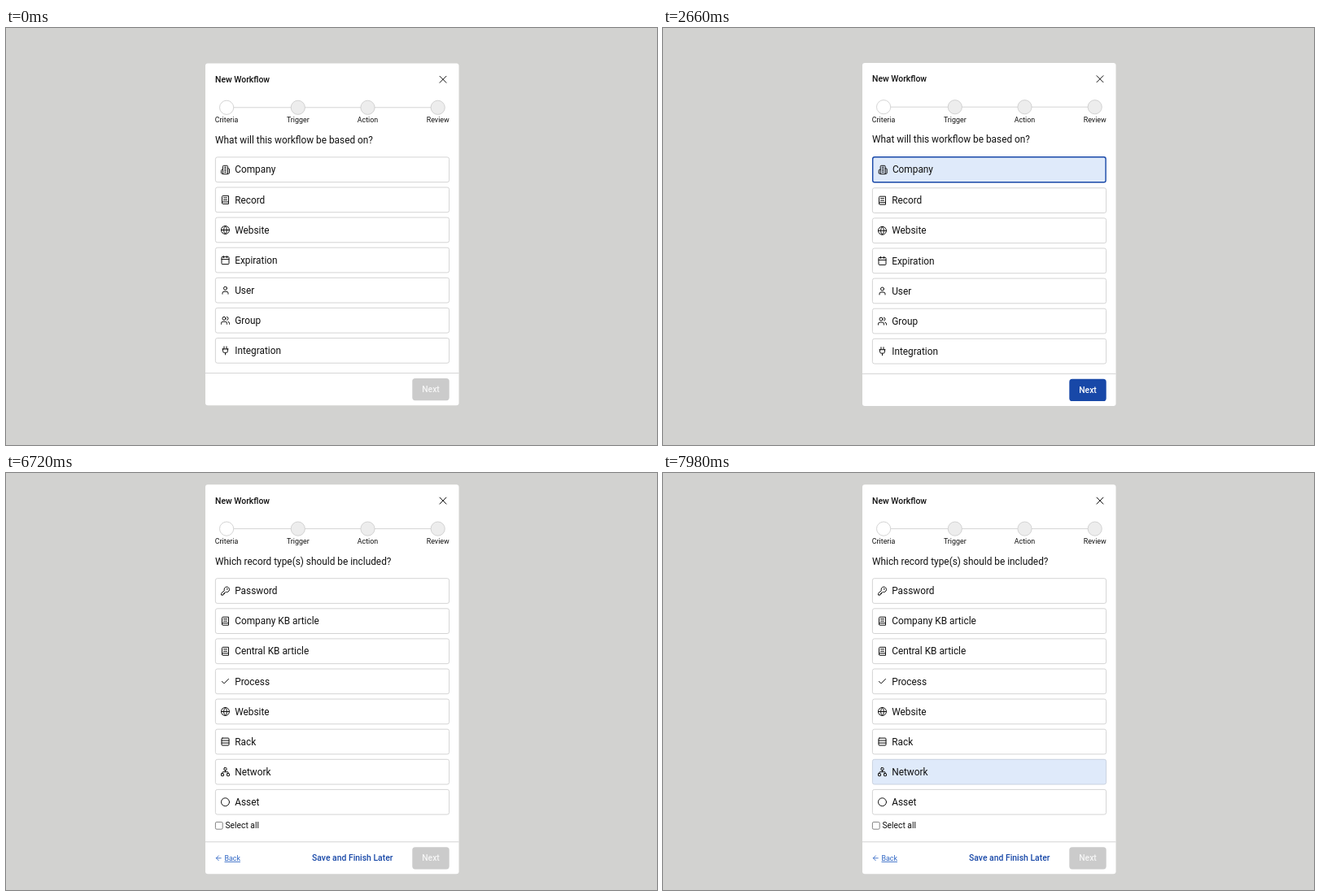
An HTML page for the animation above (8000 ms loop, 800x513 px).

```html
<!DOCTYPE html>
<html lang="en">
<head>
<meta charset="utf-8">
<title>New Workflow</title>
<style>
  html, body { margin: 0; width: 100%; height: 100%; overflow: hidden; background: #d2d2d0; }
  svg { display: block; width: 800px; height: 513px; font-family: Roboto, Arial, sans-serif; }
  .icon { fill: none; stroke: #111; stroke-width: 2; stroke-linecap: round; stroke-linejoin: round; }
  .medium { font-size: 10.4px; font-weight: 500; }
  .body { font-size: 11.85px; }
  .small { font-size: 8.87px; }
</style>
</head>
<body>
<svg id="stage" viewBox="0 0 800 513"></svg>
<script>
const LOOP = 8000;
const BLUE = '#1848a8', TINT = '#dfeafa', LINE = '#d0d0d0', INK = '#111';

const path = d => `<path d="${d}"/>`;
const ring = (x, y, r) => `<circle cx="${x}" cy="${y}" r="${r}"/>`;
const box = (x, y, w, h, r) => `<rect x="${x}" y="${y}" width="${w}" height="${h}" rx="${r}"/>`;
const rect = (x, y, w, h, r, fill, stroke = 'none', sw = 0) =>
  `<rect x="${x}" y="${y}" width="${w}" height="${h}" rx="${r}" fill="${fill}" stroke="${stroke}" stroke-width="${sw}"/>`;
const text = (x, y, cls, label, fill = INK, extra = '') =>
  `<text x="${x}" y="${y}" class="${cls}" fill="${fill}" ${extra}>${label}</text>`;
const hline = (x1, x2, y) => `<path d="M${x1} ${y}H${x2}" stroke="${LINE}" stroke-width=".9"/>`;
const shift = (y, inner) => `<g transform="translate(0 ${y})">${inner}</g>`;

// Icons live on a 24-unit grid
const ICONS = {
  building: path('M6 22V4a2 2 0 0 1 2-2h8a2 2 0 0 1 2 2v18ZM6 12H4a2 2 0 0 0-2 2v6a2 2 0 0 0 2 2h2M18 9h2a2 2 0 0 1 2 2v9a2 2 0 0 1-2 2h-2M10 6h4M10 10h4M10 14h4M10 18h4'),
  book: path('M4 19.5v-15A2.5 2.5 0 0 1 6.5 2H20v20H6.5a2.5 2.5 0 0 1 0-5H20M8 7h8M8 12h8'),
  globe: ring(12, 12, 10) + path('M12 2a14.5 14.5 0 0 0 0 20 14.5 14.5 0 0 0 0-20M2 12h20'),
  calendar: box(3, 4, 18, 18, 2) + path('M8 2v4M16 2v4M3 10h18'),
  user: ring(12, 7, 4) + path('M19 21v-2a4 4 0 0 0-4-4H9a4 4 0 0 0-4 4v2'),
  users: ring(9, 7, 4) + path('M16 21v-2a4 4 0 0 0-4-4H6a4 4 0 0 0-4 4v2M22 21v-2a4 4 0 0 0-3-3.9M16 3.1a4 4 0 0 1 0 7.8'),
  plug: path('M12 22v-5M9 8V2M15 8V2M5 8H19M18 8v5a4 4 0 0 1-4 4h-4a4 4 0 0 1-4-4V8'),
  key: path('M2.6 17.4L2 18.8V22H7V19H10V16H11.6L13.4 14.6a6.5 6.5 0 1 0-4-4Z') + ring(16.5, 7.5, .5),
  check: path('M20 6 9 17l-5-5'),
  rack: box(3, 3, 18, 18, 2) + path('M21 9H3M21 15H3'),
  network: box(16, 16, 6, 6, 1) + box(2, 16, 6, 6, 1) + box(9, 2, 6, 6, 1) + path('M5 16v-3a1 1 0 0 1 1-1h12a1 1 0 0 1 1 1v3M12 12V8'),
  circle: ring(12, 12, 10),
  close: path('M4 4L20 20M20 4L4 20'),
  back: path('M12 19l-7-7 7-7M19 12H5')
};
const icon = (name, x, y, scale = .5, stroke = INK) =>
  `<g class="icon" style="stroke:${stroke}" transform="translate(${x} ${y}) scale(${scale}) translate(-12 -12)">${ICONS[name]}</g>`;

const CRITERIA = [['building', 'Company'], ['book', 'Record'], ['globe', 'Website'], ['calendar', 'Expiration'],
  ['user', 'User'], ['users', 'Group'], ['plug', 'Integration']];
const TYPES = [['key', 'Password'], ['book', 'Company KB article'], ['book', 'Central KB article'], ['check', 'Process'],
  ['globe', 'Website'], ['rack', 'Rack'], ['network', 'Network'], ['circle', 'Asset']];
const STEPS = [['Criteria', 271.1], ['Trigger', 358.8], ['Action', 444.5], ['Review', 530.7]];

function header(question) {
  const steps = STEPS.map(([label, x], i) =>
    `<circle cx="${x}" cy="97.8" r="8.6" fill="${i ? '#ededed' : '#fff'}" stroke="#cacaca" stroke-width=".8"/>` +
    text(x, 116.4, 'small', label, INK, 'text-anchor="middle"')).join('');
  return text(257, 66.9, 'medium', 'New Workflow') + icon('close', 537, 63.3) +
    hline(271, 530, 97.8) + steps + text(257, 142, 'body', question);
}

function row([name, label], y, hovered, selected) {
  const dx = selected ? .7 : 0;
  const frame = selected
    ? rect(257.7, y - 15.3, 286.4, 30.9, 2.3, TINT, BLUE, 1.4)
    : rect(257.4, y - 15.2, 287.2, 30.7, 2.4, hovered ? TINT : '#fff', hovered ? '#c6cfdc' : LINE, .9);
  return frame + icon(name, 269.5 + dx, y + .2) + text(281.2 + dx, y + 4.3, 'body', label);
}

// y is the divider line above the buttons
function footer(y, active) {
  return shift(y, hline(245, 556.5, 0) + rect(499.3, 6.4, 45.4, 27.2, 3.6, active ? BLUE : '#cbcbcb') +
    text(522, 23.6, 'medium', 'Next', active ? '#fff' : '#f5f5f5', 'text-anchor="middle"'));
}

const card = (y, h) => rect(245, y, 311.5, h, 3, '#fff');

function criteria(hover, picked) {
  const rows = CRITERIA.map((item, i) =>
    row(item, 174.1 + 37.1 * i + (picked && i ? .8 : 0), hover === i, picked && i === 0)).join('');
  return (picked ? card(42.9, 422) : card(43.5, 420.7)) +
    shift(picked ? -.6 : 0, header('What will this workflow be based on?')) +
    rows + footer(picked ? 425.4 : 424.6, picked);
}

function types(hover) {
  return card(14.3, 479) + shift(-29.2, header('Which record type(s) should be included?')) +
    TYPES.map((item, i) => row(item, 144.9 + 37.1 * i, hover === i)).join('') +
    rect(257.4, 429.4, 8.8, 8.8, 1.5, '#fff', '#777', .9) +
    text(269.5, 437.4, '', 'Select all', INK, 'font-size="10.3"') + footer(453.8, false) +
    icon('back', 261.3, 473.8, .42, '#2f66c4') +
    text(268.5, 476.9, 'small', 'Back', '#2f66c4', 'text-decoration="underline"') +
    text(376, 477.4, 'medium', 'Save and Finish Later', BLUE);
}

// [start, screen, hovered row (-1 for none), picked]
const TIMELINE = [
  [0, criteria, -1, false], [2100, criteria, 0, false], [2660, criteria, 0, true],
  [4480, types, -1], [6300, types, 1], [6720, types, -1], [6790, types, 2],
  [7000, types, -1], [7070, types, 3], [7350, types, -1], [7420, types, 4],
  [7700, types, -1], [7770, types, 5], [7910, types, -1], [7980, types, 6]
];

const stage = document.getElementById('stage');
let shown;
function tick() {
  const t = performance.now() % LOOP;
  const state = TIMELINE.findLast(s => s[0] <= t);
  if (state !== shown) {
    const [, screen, ...args] = shown = state;
    stage.innerHTML = screen(...args);
  }
  requestAnimationFrame(tick);
}
tick();
</script>
</body>
</html>
```
